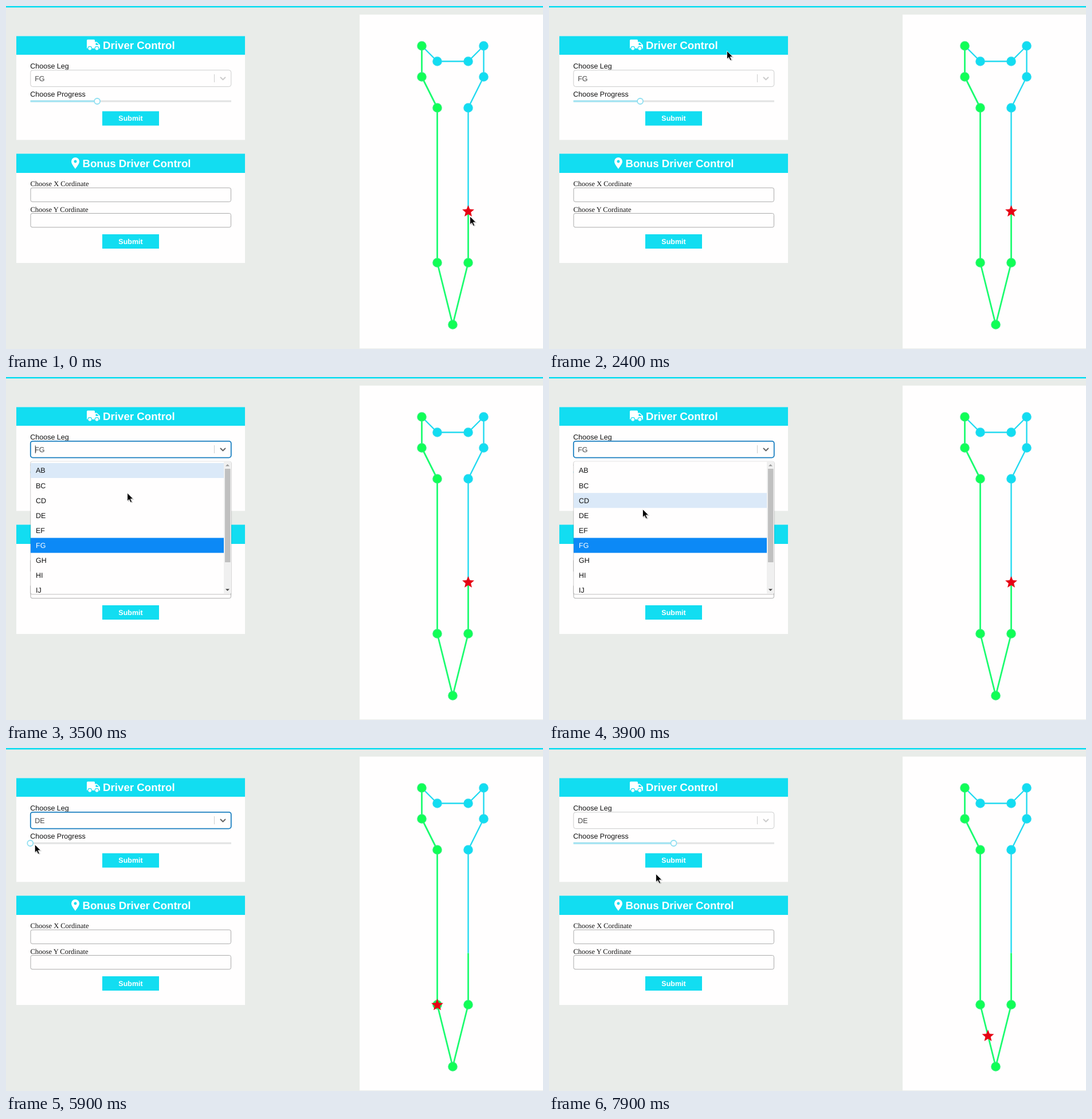
Write an HTML page that moves like this. It is 937 px wide and 598 px high and loops after 8 s.

```html
<!DOCTYPE html>
<html lang="en">
<head>
<meta charset="utf-8">
<title>Driver Control</title>
<style>
  html, body { margin: 0; height: 100%; overflow: hidden; background: #e9ece9; }
  svg { display: block; width: 937px; height: 598px; }
  text { font: 12.5px "Liberation Sans", Arial, sans-serif; fill: #111; text-rendering: geometricPrecision; }
  .title { font-size: 18.72px; font-weight: bold; fill: #fff; }
  .button { font-weight: bold; fill: #fff; text-anchor: middle; }
  .serif { font-family: "Liberation Serif", "Times New Roman", serif; }
  .cyan { fill: #12ddf1; }
  .white { fill: #fffefe; }
  .line { fill: none; stroke-linejoin: round; }
</style>
</head>
<body>
<svg viewBox="0 0 937 598">
  <rect class="cyan" width="937" height="2.6"/>
  <rect class="white" x="617" y="15" width="320" height="582"/>

  <rect class="white" x="18" y="52.5" width="399" height="181"/>
  <rect class="cyan" x="18" y="52.5" width="399" height="32.5"/>
  <g fill="#fff">
    <rect x="141" y="58.5" width="14" height="15.5" rx="1.5"/>
    <path d="M154 63h4.5l5 5v6H154z" stroke="#fff" stroke-linejoin="round"/>
    <path class="cyan" d="M156.5 64.5h2l3.3 3.5h-5.3z"/>
    <g stroke="#12ddf1" stroke-width="1.2">
      <circle cx="146.3" cy="74" r="3.4"/><circle cx="158.5" cy="74" r="3.4"/>
    </g>
  </g>
  <text class="title" x="169" y="75">Driver Control</text>
  <text x="42.3" y="109">Choose Leg</text>
  <rect id="select" x="42.8" y="111.8" width="350" height="28.8" rx="4" fill="#fffefe"/>
  <text id="leg" x="50.2" y="130.5" style="fill:#444"></text>
  <path id="caret" d="M51.3 119.5v13.5" stroke="#333"/>
  <path d="M363.5 119v14" stroke="#ccc"/>
  <path id="arrow" class="line" d="M374.5 124.5l4 4 4-4" stroke-width="2" stroke-linecap="round"/>
  <text x="42.3" y="158">Choose Progress</text>
  <path d="M43 166H393" stroke="#e2e3e3" stroke-width="3"/>
  <path id="fill" stroke="#a0e3f3" stroke-width="3"/>
  <circle id="thumb" cy="166" r="5" fill="#fffefe" stroke="#8fdff1" stroke-width="1.8"/>
  <rect class="cyan" x="168" y="183.5" width="99" height="25"/>
  <text class="button" x="217.5" y="200.3">Submit</text>

  <rect class="white" x="18" y="257.5" width="399" height="190.5"/>
  <rect class="cyan" x="18" y="257.5" width="399" height="33.5"/>
  <path fill="#fff" fill-rule="evenodd" d="M121 284C118 279.5 114 275 114 271a7 7 0 0 1 14 0C128 275 124 279.5 121 284zM121 268.5a2.5 2.5 0 1 0 .01 0z"/>
  <text class="title" x="133.4" y="280.5">Bonus Driver Control</text>
  <text class="serif" x="42.5" y="314">Choose X Cordinate</text>
  <text class="serif" x="42.5" y="358.7">Choose Y Cordinate</text>
  <g fill="#fffefe" stroke="#aaa">
    <rect x="43" y="317" width="349.5" height="24.3" rx="3"/>
    <rect x="43" y="361.5" width="349.5" height="24.3" rx="3"/>
  </g>
  <rect class="cyan" x="168" y="398" width="99" height="25"/>
  <text class="button" x="217.5" y="415.3">Submit</text>

  <path id="ahead" class="line" stroke="#22daf0" stroke-width="2.4"/>
  <path id="driven" class="line" stroke="#1cfc70" stroke-width="2.8"/>
  <g id="nodes"></g>
  <path id="star" fill="#e60314"/>

  <g id="menu">
    <rect x="42" y="147" width="352" height="233" rx="4" opacity=".1"/>
    <rect class="white" x="43" y="147" width="350" height="231.5" rx="3" stroke="#000" stroke-opacity=".1"/>
    <rect id="hover" x="43" width="337" height="26.1" fill="#dbe9f8"/>
    <rect x="43" y="280.5" width="337" height="26.1" fill="#0c89f6"/>
    <g id="options"></g>
    <rect x="380" y="147.5" width="12.5" height="230" fill="#f0f0f0"/>
    <rect x="382" y="160" width="9.5" height="163" fill="#c0c0c0"/>
    <path d="M383 155.5l3.5-3.5 3.5 3.5z" fill="#999"/>
    <path d="M383 369.5l3.5 3.5 3.5-3.5z" fill="#444"/>
  </g>
  <g id="cursor">
    <path d="M1.5 1.5v14l3.3-3 2.4 5 2.3-1-2.3-5h4.6z" opacity=".25"/>
    <path d="M0 0V14L3.2 11.2L5.6 16.6L7.9 15.6L5.6 10.3H10.2Z" stroke="#fff" stroke-width=".8"/>
  </g>
</svg>
<script>
const $ = id => document.getElementById(id);
const set = (id, attrs) => { for (const k in attrs) $(id).setAttribute(k, attrs[k]); };
const show = (id, on) => set(id, { visibility: on ? 'visible' : 'hidden' });
const mix = (a, b, f) => a + (b - a) * f;

// Corners A to K of the route, on a 27 px grid
const corners = 'ABCDEFGHIJK';
const route = [[0, 0], [0, 2], [1, 4], [1, 14], [2, 18], [3, 14], [3, 4], [4, 2], [4, 0], [3, 1], [1, 1]]
  .map(([x, y]) => [725.5 + 27 * x, 69.5 + 27 * y]);

function pointOn(leg, progress) {
  const [from, to] = [...leg].map(c => route[corners.indexOf(c)]);
  return from.map((v, i) => mix(v, to[i], progress));
}

const reached = pointOn('FG', 1 / 3);
set('driven', { d: 'M' + [...route.slice(0, 6), reached].join('L') });
set('ahead', { d: 'M' + [reached, ...route.slice(6), route[0]].join('L') });
$('nodes').innerHTML = route.map(([x, y], i) => `<circle cx="${x}" cy="${y}" r="7.6" stroke-width="1.4"
  fill="${i < 6 ? '#10ff55' : '#12ddf1'}" stroke="${i < 6 ? '#2ef077' : '#28d8ee'}"/>`).join('');

const starPoints = Array.from({ length: 10 }, (_, i) => {
  const r = i % 2 ? 4.9 : 11, a = i * Math.PI / 5;
  return [r * Math.sin(a), 0.7 - r * Math.cos(a)];
});
set('star', { d: 'M' + starPoints.join('L') + 'Z' });

const rowY = i => 150 + 26.1 * i;
for (let i = 0; i < 9; i++) {
  const leg = corners.slice(i, i + 2);
  $('options').innerHTML +=
    `<text x="52" y="${rowY(i) + 17.4}"${leg === 'FG' ? ' style="fill:#fff"' : ''}>${leg}</text>`;
}

// Each move runs from start to end; arc bends the path down (or up when negative)
const moves = [
  { start: 200, end: 400, x: 804, y: 422 },
  { start: 500, end: 1400, x: 645.6, y: 243.6 },
  { start: 1400, end: 2600, x: 243.5, y: 118.5, arc: -122 },
  { start: 3300, end: 3700, x: 180, y: 286 },
  { start: 3700, end: 3900, x: 163.5, y: 230.5, arc: -50 },
  { start: 4100, end: 4300, x: 160, y: 239.5 },
  { start: 4600, end: 5500, x: 162, y: 186, arc: 90 },
  { start: 5500, end: 5900, x: 50.3, y: 168.3 }
];
const release = { start: 7500, end: 7900, x: 186.6, y: 219.6 };
const drags = [
  { start: 6200, end: 6900, x: .35 },
  { start: 6900, end: 7100, x: .06 },
  { start: 7100, end: 7400, x: .5 }
];

function follow(list, from, t) {
  let { x, y } = from;
  for (const m of list) {
    const f = Math.min(1, Math.max(0, (t - m.start) / (m.end - m.start)));
    x = mix(x, m.x, f);
    y = mix(y, m.y, f) + (m.arc || 0) * Math.sin(Math.PI * f);
  }
  return { x, y };
}

const progressAt = t => t < 4400 ? 1 / 3 : follow(drags, { x: 0 }, t).x;
const thumbAt = t => 42.3 + 350.5 * progressAt(t);

function cursorAt(t) {
  if (t < 6200) return follow(moves, { x: 809.6, y: 366.8 }, t);
  return follow([release], { x: thumbAt(t) + 8, y: 168.3 }, t);
}

function render(t) {
  const chosen = t >= 4400, open = t >= 2900 && !chosen;
  const opening = t === 2900, focused = t >= 2900 && t < 6300, hovered = t >= 2500;
  const leg = chosen ? 'DE' : 'FG';

  const { x, y } = cursorAt(t);
  set('cursor', { transform: `translate(${x} ${y})` });

  $('leg').textContent = leg;
  set('select', {
    stroke: opening ? '#5599c4' : focused ? '#1b7fc0' : hovered && !chosen ? '#b3b3b3' : '#ccc',
    'stroke-width': focused ? 1.8 : 1
  });
  set('arrow', { stroke: opening ? '#999' : focused ? '#666' : '#ccc' });
  show('caret', open && (t < 3600 || t >= 4200));
  show('menu', open);
  // The highlight lags one step behind the cursor
  set('hover', { y: rowY(Math.max(0, Math.floor((cursorAt(t - 100).y - 150) / 26.1))) });

  const thumbX = thumbAt(t);
  set('thumb', { cx: thumbX });
  set('fill', { d: `M42.5 166H${thumbX}` });
  set('star', { transform: `translate(${pointOn(leg, progressAt(t))})` });
}

function loop() {
  render(Math.floor(performance.now() % 8000 / 100) * 100);
  requestAnimationFrame(loop);
}
loop();
</script>
</body>
</html>
```
